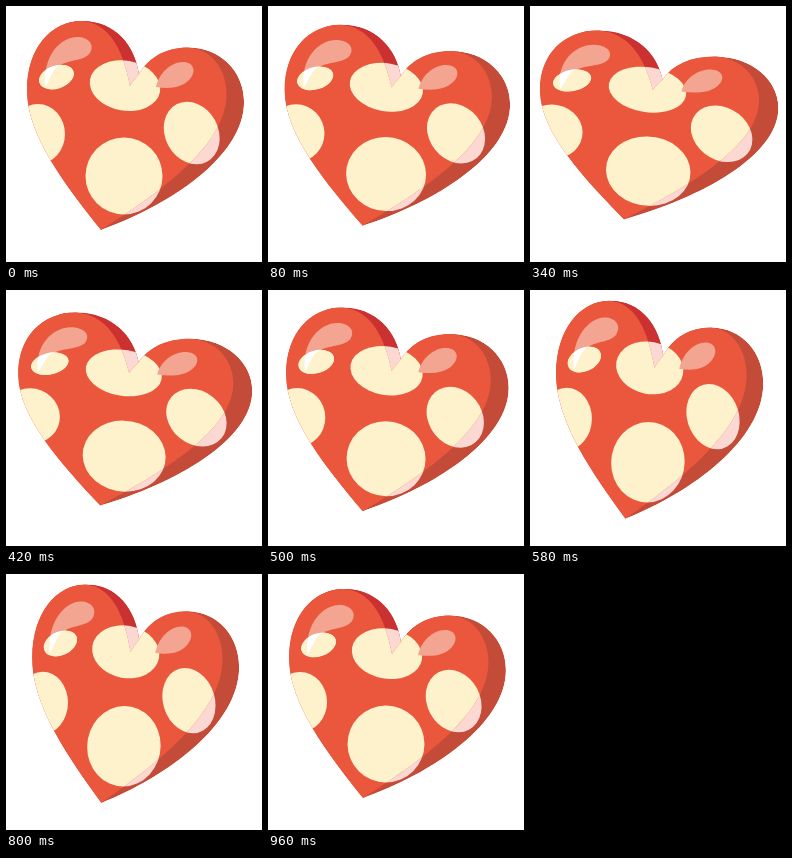
An HTML page that plays this animation: 256 px wide and 256 px high, repeating every 980 ms.

```html
<!DOCTYPE html>
<html>
<head>
<meta charset="utf-8">
<style>
  html, body { margin: 0; width: 100%; height: 100%; overflow: hidden; background: #fff; }
  svg { display: block; width: 100vw; height: 100vh; }
</style>
</head>
<body>
<svg viewBox="0 0 256 256">
  <defs>
    <path id="outline" d="M95 224C60 180 21 130 21 84C21 42 45 15 76 15C110 15 129 40 133 68C143 51 160 41.5 182 41.5C215 41.5 238 66 238 96C238 150 165 199 95 224Z"/>
    <path id="face" d="M95 224C60 180 21 130 21 84C21 42 45 15 76 15C103 17 117 43 124 80C126 76 129 73 133 68C143 51 160 41.5 182 41.5C206 43 220.500 64 220.500 88C220.500 136 163 181 95 224Z"/>
    <ellipse id="smallSpot" cx="50.5" cy="71" rx="18" ry="11.5" transform="rotate(-19 50.5 71)"/>
    <path id="shine" d="M39.5 81C36 50 55 31 71 31C83 31 89 39 84 47C78 56 58 53 49 63C45 69 43 75 39.500 81Z"/>
    <g id="spots">
      <use href="#smallSpot"/>
      <ellipse cx="119" cy="79.7" rx="35.5" ry="25" transform="rotate(10 119 79.7)"/>
      <ellipse cx="185.7" cy="127" rx="26.5" ry="32.5" transform="rotate(-28 185.7 127)"/>
      <circle cx="118" cy="170" r="38.5"/>
      <ellipse cx="32" cy="128" rx="27" ry="30"/>
    </g>
    <clipPath id="inOutline"><use href="#outline"/></clipPath>
    <clipPath id="inFace"><use href="#face"/></clipPath>
    <clipPath id="inSmallSpot"><use href="#smallSpot"/></clipPath>
  </defs>
  <g id="heart">
    <g clip-path="url(#inOutline)">
      <use href="#outline" fill="#c44b38"/>
      <path d="M60 0H134V90H60Z" fill="#cc3131"/>
      <use href="#spots" fill="#fbd8d2"/>
    </g>
    <use href="#face" fill="#ea573c"/>
    <use href="#spots" fill="#fdf2cc" clip-path="url(#inFace)"/>
    <g fill="#f3a592">
      <use href="#shine"/>
      <path d="M150 81C153 67 165 56 177 56C188 56 191 66 183 74C175 82 163 83 150 81Z"/>
    </g>
    <g clip-path="url(#inSmallSpot)">
      <use href="#smallSpot" fill="#fdf2cc"/>
      <use href="#shine" fill="#fff"/>
    </g>
  </g>
</svg>
<script>
  const LOOP = 980, CX = 126, CY = 122, TILT = 6;
  const heart = document.getElementById('heart');

  // [time, squash, slope per ms]
  const keys = [
    [0, 0, .004], [180, .82, .0026], [340, 1, 0], [540, -.08, -.0094],
    [690, -1, 0], [800, -.47, .0048], [980, 0, 0]
  ];

  function squashAt(t) {
    const i = keys.findIndex(k => k[0] > t);
    const [t0, v0, m0] = keys[i - 1], [t1, v1, m1] = keys[i];
    const d = t1 - t0, s = (t - t0) / d, r = 1 - s;
    return r * r * (1 + 2 * s) * v0 + s * r * r * d * m0
         + s * s * (3 - 2 * s) * v1 - s * s * r * d * m1;
  }

  // The heart is squashed along its own slightly tilted axis.
  function draw(now) {
    const u = squashAt(now % LOOP) * .1;
    heart.setAttribute('transform',
      `translate(${CX} ${CY}) rotate(${TILT}) scale(${1 + u} ${1 - u}) rotate(${-TILT}) translate(${-CX} ${-CY})`);
    requestAnimationFrame(draw);
  }
  draw(performance.now());
</script>
</body>
</html>
```
